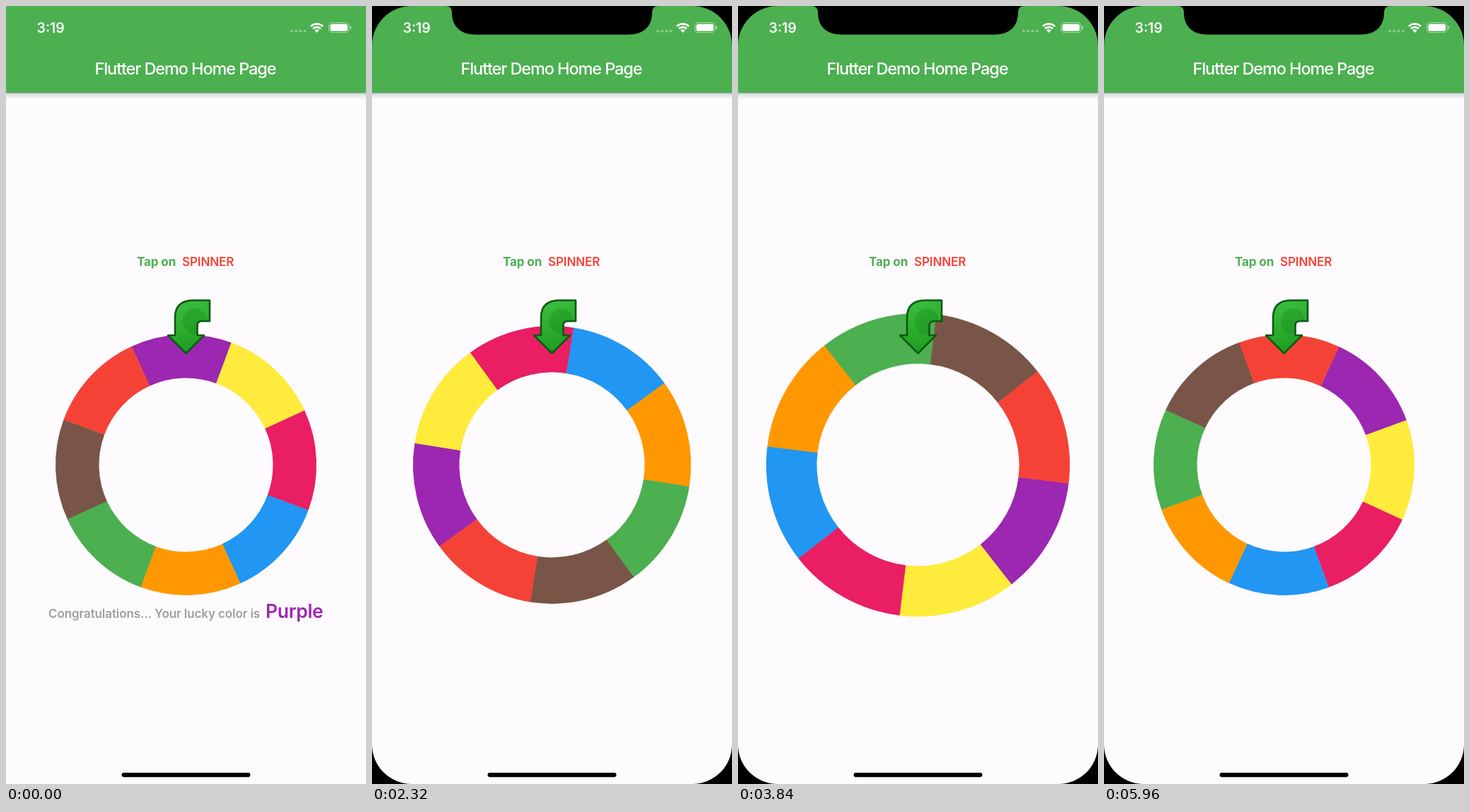
Recreate the animation shown at these times as an HTML page with a canvas. Size 509 px wide and 1101 px high, loop 7280 ms.

```html
<!DOCTYPE html>
<html lang="en">
<head>
<meta charset="utf-8">
<title>Spinner</title>
<style>
  html, body { margin: 0; width: 100%; height: 100%; overflow: hidden; background: #fdfbfe; }
  canvas { display: block; width: 509px; height: 1101px; }
</style>
</head>
<body>
<canvas id="stage" width="509" height="1101"></canvas>
<script>
const ctx = document.getElementById('stage').getContext('2d');
const W = 509, H = 1101, LOOP = 7280, STEP = 40;
const TAP = 920, START = 988, PEAK = 3405, SLOW = 2621, STOP = 5960;
const CX = 254.5, CY = 649.4, RADIUS = 184.5, GROWTH = 38.6;
const GREEN = '#4caf50', PAPER = '#fdfbfe', RED = '#f44336', PURPLE = '#9c27b0';
const SLICES = [PURPLE, '#ffeb3b', '#e91e63', '#2196f3', '#ff9800', GREEN, '#795548', RED];

// cubic-bezier(.25, .1, .25, 1)
function ease(x) {
  let lo = 0, hi = 1;
  for (let i = 0; i < 30; i++) {
    const s = (lo + hi) / 2;
    if (0.75 * s - 0.75 * s * s + s ** 3 < x) lo = s; else hi = s;
  }
  return 0.3 * lo + 2.4 * lo * lo - 1.7 * lo ** 3;
}

// The wheel winds up counterclockwise while growing, then unwinds and shrinks.
function pose(t) {
  if (t < START) return { angle: -2.2, radius: RADIUS };
  if (t >= STOP) return { angle: 47.4, radius: RADIUS };
  if (t < PEAK) {
    const k = ((t - START) / (PEAK - START)) ** 1.95;
    return { angle: -2.2 - 2625 * k, radius: RADIUS + GROWTH * k };
  }
  const k = 1 - ease((t - PEAK) / SLOW);
  return { angle: 47.4 - 2674 * k, radius: RADIUS + GROWTH * k };
}

function text(str, x, y, size, weight, color, spacing = 0, align = 'left') {
  ctx.font = `${weight} ${size}px Inter, "Liberation Sans", sans-serif`;
  ctx.letterSpacing = spacing + 'px';
  ctx.textAlign = align;
  ctx.fillStyle = color;
  ctx.fillText(str, x, y);
}

function pill(x, y, w, h, r, color) {
  ctx.beginPath();
  ctx.roundRect(x, y, w, h, r);
  ctx.fillStyle = color;
  ctx.fill();
}

function drawHeader() {
  const shade = ctx.createLinearGradient(0, 122, 0, 132);
  shade.addColorStop(0, 'rgba(70,60,100,.42)');
  shade.addColorStop(0.35, 'rgba(70,60,100,.14)');
  shade.addColorStop(1, 'rgba(70,60,100,0)');
  ctx.fillStyle = shade;
  ctx.fillRect(0, 122, W, 10);
  ctx.fillStyle = GREEN;
  ctx.fillRect(0, 0, W, 123);
  text('Flutter Demo Home Page', 253.5, 97, 23.5, 500, '#fff', -1.1, 'center');
}

function drawStatus() {
  text('3:19', 43.5, 37.5, 19.5, 600, '#fff');
  for (let i = 0; i < 4; i++) pill(402 + i * 6.2, 33.5, 4, 4, 2, 'rgba(255,255,255,.35)');

  ctx.strokeStyle = '#fff';
  ctx.lineWidth = 2.8;
  for (const r of [7.7, 12.2]) {
    ctx.beginPath();
    ctx.arc(439.5, 37.5, r, -Math.PI * 0.75, -Math.PI * 0.25);
    ctx.stroke();
  }
  ctx.beginPath();
  ctx.moveTo(439.5, 38);
  ctx.arc(439.5, 37.5, 4.4, -Math.PI * 0.75, -Math.PI * 0.25);
  ctx.fillStyle = '#fff';
  ctx.fill();

  ctx.beginPath();
  ctx.roundRect(456.5, 23.5, 28.5, 14, 4.5);
  ctx.lineWidth = 1.1;
  ctx.strokeStyle = 'rgba(255,255,255,.5)';
  ctx.stroke();
  pill(458.5, 25.5, 24.5, 10, 2.6, '#fff');
  pill(486.3, 28, 1.8, 5, [0, 2, 2, 0], 'rgba(255,255,255,.55)');
}

function drawWheel({ angle, radius }) {
  const slice = Math.PI / 4;
  const first = (angle - 112.5) * Math.PI / 180;
  ctx.lineWidth = radius / 3;
  SLICES.forEach((color, i) => {
    const from = first + i * slice;
    ctx.beginPath();
    ctx.arc(CX, CY, radius * 5 / 6, from, from + slice + 0.002);
    ctx.strokeStyle = color;
    ctx.stroke();
  });
}

function drawArrow() {
  const arrow = new Path2D(
    'M288 416.5H264Q239 417 239 441V466H229L254.5 491.5L280 466H270.5V452Q270.5 446 277 446H288Z');
  const fill = ctx.createLinearGradient(245, 418, 268, 488);
  fill.addColorStop(0, '#3cbd3f');
  fill.addColorStop(0.5, '#2cae2e');
  fill.addColorStop(1, '#1f9d20');
  ctx.fillStyle = fill;
  ctx.fill(arrow);
  ctx.save();
  ctx.clip(arrow);
  ctx.beginPath();
  ctx.ellipse(267, 446, 17, 18, 0, 0, Math.PI * 2);
  ctx.fillStyle = 'rgba(10,110,20,.22)';
  ctx.fill();
  ctx.restore();
  ctx.lineWidth = 2.6;
  ctx.lineJoin = 'round';
  ctx.strokeStyle = '#0b5a14';
  ctx.stroke(arrow);
}

// Black phone frame: rounded corners and notch
function drawBezel() {
  ctx.fillStyle = '#000';
  ctx.beginPath();
  ctx.rect(0, 0, W, H);
  ctx.roundRect(0, 0, W, H, 56);
  ctx.fill('evenodd');
  ctx.fill(new Path2D(
    'M104 0Q113 0 113 9C113 29 125 40.5 147 40.5H362C384 40.5 396 29 396 9Q396 0 405 0Z'));
}

function draw(t) {
  ctx.fillStyle = PAPER;
  ctx.fillRect(0, 0, W, H);
  drawHeader();
  drawStatus();
  text('Tap on', 185, 368, 17, 700, GREEN, -0.1);
  text('SPINNER', 249, 368, 17, 600, RED, -0.1);
  drawWheel(pose(t));
  drawArrow();
  if (t < TAP) {
    text('Congratulations... Your lucky color is', 60, 866, 17, 600, '#9e9e9e', -0.1);
    text('Purple', 367, 866, 26.5, 600, PURPLE, -0.3);
  } else {
    drawBezel();
  }
  pill(163.5, 1085, 182, 6.2, 3.1, '#000');
}

const origin = performance.now();
function tick() {
  const t = (performance.now() - origin) % LOOP;
  draw(Math.floor(t / STEP) * STEP);
  requestAnimationFrame(tick);
}
tick();
</script>
</body>
</html>
```
